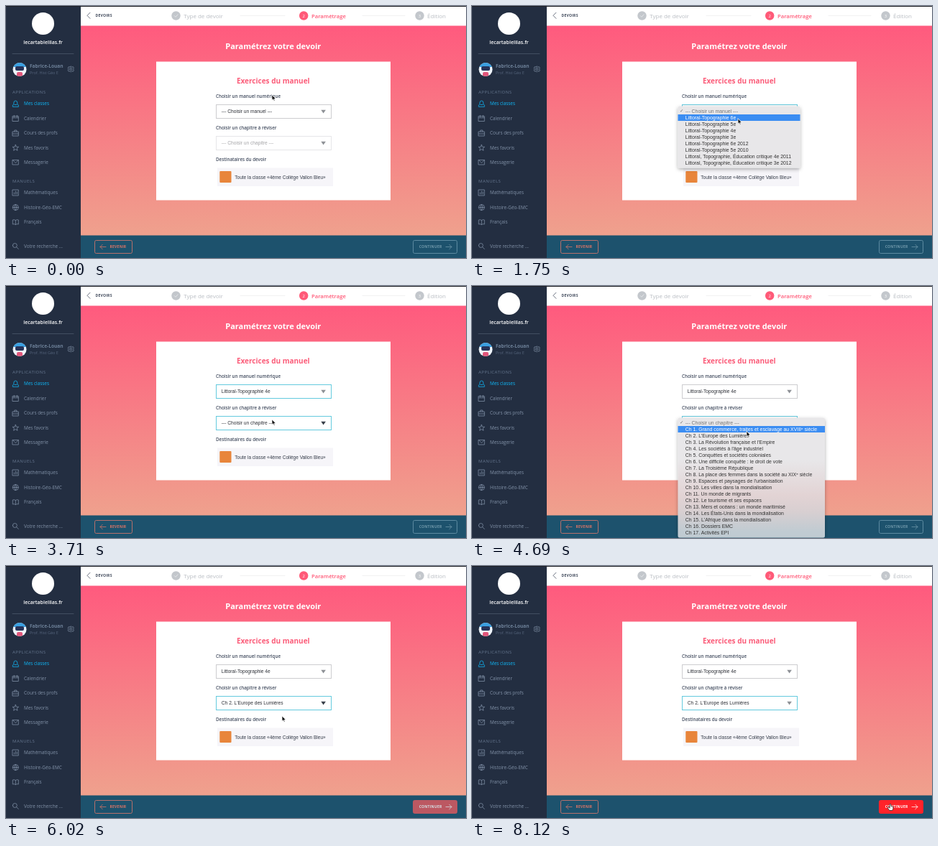
Write an HTML page that moves like this. It is 640x351 px and loops after 8.19 s.

```html
<!DOCTYPE html>
<html lang="fr">
<head>
<meta charset="utf-8">
<title>Paramétrez votre devoir</title>
<style>
  html, body { margin: 0; width: 100%; height: 100%; overflow: hidden; background: #232e41; }
  svg { display: block; width: 640px; height: 351px; font-family: "Open Sans", sans-serif; }
  .arial { font-family: "Liberation Sans", Arial, sans-serif; }
  .icon { fill: none; stroke-width: .75; stroke-linecap: round; stroke-linejoin: round; }
</style>
</head>
<body>
<svg id="stage" viewBox="0 0 640 351">
  <defs>
    <linearGradient id="sky" x2="0" y2="1">
      <stop stop-color="#ff5a7e"/><stop offset="1" stop-color="#efa18d"/>
    </linearGradient>
    <linearGradient id="glass" x2="0" y2="1">
      <stop offset=".35" stop-color="#e8e7e9"/><stop offset=".65" stop-color="#e2d3d4"/>
      <stop offset=".78" stop-color="#d8cfd1"/><stop offset=".95" stop-color="#c0cbd2"/>
    </linearGradient>
    <filter id="shadow" x="-10%" y="-10%" width="120%" height="125%">
      <feDropShadow dx="0" dy="2" stdDeviation="2.5" flood-opacity=".32"/>
    </filter>
    <clipPath id="face"><circle cx="19" cy="88.5" r="9.5"/></clipPath>
  </defs>
</svg>
<script>
const LOOP = 8190, CYAN = [100, 202, 222], GREY = [205, 205, 208];
const OPEN_BOOK = 1260, PICK_BOOK = 2450, OPEN_CHAPTER = 4130, PICK_CHAPTER = 5880, HOVER_NEXT = 7250;
const stage = document.getElementById('stage');

function add(tag, attrs, parent = stage) {
  const node = document.createElementNS('http://www.w3.org/2000/svg', tag);
  for (const name in attrs) node.setAttribute(name, attrs[name]);
  return parent.appendChild(node);
}
const set = (node, name, value) => node.setAttribute(name, value);
const rect = (x, y, width, height, fill, more = {}, parent) =>
  add('rect', { x, y, width, height, fill, ...more }, parent);
const path = (d, stroke, more = {}, parent) => add('path', { d, stroke, class: 'icon', ...more }, parent);
function text(content, x, y, size, fill, more = {}, parent) {
  const node = add('text', { x, y, 'font-size': size, fill, ...more }, parent);
  node.textContent = content;
  return node;
}
const arial = { class: 'arial' };
const bold = { 'font-weight': 700 };
const semi = { 'font-weight': 600 };
const middle = { 'text-anchor': 'middle' };

// Page background
rect(104, 27, 536, 293, 'url(#sky)');
rect(104, 0, 536, 27.5, '#fff');
rect(104, 319.5, 536, 31.5, '#1d526d');
rect(209, 77.5, 326, 193, '#fff');

// Sidebar
rect(0, 0, 104, 351, '#232e41');
rect(0, 0, 640, 1, '#1b1e24');
add('circle', { cx: 51.5, cy: 24.5, r: 15.5, fill: '#fff' });
text('lecartablelilas.fr', 51.5, 52.8, 7, '#fff', { ...semi, ...middle });
path('M9 66.5H94', '#4c586c');
const avatar = add('g', { 'clip-path': 'url(#face)' });
rect(9, 78, 20, 21, '#eef4fa', {}, avatar);
rect(9, 78, 20, 7, '#3a9fe0', {}, avatar);
rect(13, 84, 12, 6, '#27345a', { rx: 2 }, avatar);
rect(15, 92, 8, 7, '#e2577b', { rx: 2 }, avatar);
text('Fabrice-Louan', 33, 86, 6.6, '#6d8098', bold);
text('Prof. Hist Géo E', 33, 95, 5.5, '#56657d');
path('M90.3 84l1.3 1.1 1.8-.4.9 1.6-.7 1.6.7 1.6-.9 1.6-1.8-.4-1.3 1.1-1.3-1.1-1.8.4-.9-1.6.7-1.6-.7-1.6.9-1.6 1.8.4zM88.8 87.9a1.5 1.5 0 103 0 1.5 1.5 0 10-3 0', '#8090a6');

const caps = { 'letter-spacing': .5 };
text('APPLICATIONS', 9, 122.2, 6, '#66778f', caps);
text('MANUELS', 9, 246.2, 6, '#66778f', caps);

const book = 'M0-2.5Q-2-4-4-3V3Q-2 2 0 3.5Q2 2 4 3V-3Q2-4 0-2.5V3.5';
const links = [
  ['Mes classes', 136, 'M-4 4V2L-2.5 1V-1A2.5 3 0 012.5-1V1L4 2V4ZM-1.5 1.5H1.5'],
  ['Calendrier', 156.5, 'M-4-3H4V4H-4ZM-4-.8H4M-2-4.2V-2M2-4.2V-2'],
  ['Cours des profs', 177, 'M-4-2H4V4H-4ZM-1.5-2V-4H1.5V-2M-4 1H4'],
  ['Mes favoris', 197.5, 'M0-4.2L1.2-1.3 4.3-1.2 1.9.8 2.7 3.8 0 2.1-2.7 3.8-1.9.8-4.3-1.2-1.2-1.3Z'],
  ['Messagerie', 217.5, 'M-4-3H4V3.5H-4ZM-4-3L0 1 4-3'],
  ['Mathématiques', 260, 'M-4-4H4V4H-4ZM-2 2V0M0 2V-2M2 2V-1'],
  ['Histoire-Géo-EMC', 280.5, 'M-4 0A4 4 0 104 0 4 4 0 10-4 0H4M0-4Q-3 0 0 4M0-4Q3 0 0 4'],
  ['Français', 301, book],
  ['Votre recherche ...', 334.5, 'M-4-1A3 3 0 102-1 3 3 0 10-4-1M1.3 1.2L4 4']
];
links.forEach(([label, y, icon], i) => {
  const color = i ? '#8292a8' : '#0fb8f8';
  path(icon, color, { transform: `translate(13.3 ${y})` });
  text(label, 25, y + 2.3, 6.4, color);
});

// Stepper
path('M117 9.2L113 13.3L117 17.4', '#3c4658', { 'stroke-width': 1 });
text('DEVOIRS', 124.5, 15.2, 5, '#3c4658', { ...bold, 'letter-spacing': .25 });
path('M326 13.5H388M496 13.5H555', '#ececee');
[[236.5, '#c3c7cc'], [414.2, '#ff5a78'], [575.5, '#c3c7cc']].forEach(([cx, fill], i) => {
  add('circle', { cx, cy: 13.5, r: 6.2, fill });
  if (i) text(i + 1, cx, 15.6, 6, '#fff', middle);
});
path('M234.3 13.6L236 15.3L239 11.9', '#eceef0');
text('Type de devoir', 247.2, 16.5, 8, '#b9bdc3');
text('Paramétrage', 425, 16.5, 7.7, '#ff5a78', semi);
text('Édition', 586, 16.5, 8, '#b9bdc3');

// Form
text('Paramétrez votre devoir', 371.8, 59.8, 11, '#fff', { ...bold, ...middle });
text('Exercices du manuel', 371.8, 107.6, 10, '#fb5c79', { ...bold, ...middle });
text('Choisir un manuel numérique', 292, 127.6, 6.25, '#414b5e', semi);
text('Choisir un chapitre à réviser', 292, 171.6, 6.25, '#414b5e', semi);
text('Destinataires du devoir', 292, 215.6, 6.25, '#414b5e', semi);
rect(294, 225.5, 161, 25.5, '#f6f5f9');
rect(297.3, 230, 16.2, 16, '#e8853b', { rx: 1 });
text('Toute la classe «4ème Collège Vallon Bleu»', 318.3, 240.6, 6.5, '#333a47', arial);

function makeSelect(y) {
  return {
    box: rect(292.5, y - 9.5, 160, 19, '#fff', { 'stroke-width': 1 }),
    label: text('', 299.8, y + 2.4, 6.65, '#333', arial),
    arrow: add('path', { d: `M438.3 ${y - 2.3}h6.6l-3.3 4.8z` })
  };
}
const bookSelect = makeSelect(147), chapterSelect = makeSelect(191);

// Bottom bar
const buttonText = { ...bold, 'letter-spacing': .25 };
rect(123.5, 326.5, 52, 18, 'none', { rx: 2, stroke: '#b5706b', 'stroke-width': 1 });
path('M139 335.5H131M134.2 332.3L131 335.5L134.2 338.7', '#dc7566');
text('REVENIR', 144.5, 337.4, 5, '#dc7566', buttonText);
const nextBox = rect(566.5, 326.5, 61, 18, 'none', { rx: 2, 'stroke-width': 1 });
const nextLabel = text('CONTINUER', 574.7, 337.4, 5, '#fff', buttonText);
const nextArrow = path('M612 335.5H620M616.8 332.3L620 335.5L616.8 338.7', '#fff');

// Drop-down menus
function makeMenu(firstY, width, fill, items) {
  const group = add('g', arial);
  rect(286.5, firstY - 6.5, width, items.length * 9 + 5, fill, { rx: 2.5, filter: 'url(#shadow)' }, group);
  const bar = rect(286.5, 0, width, 9, '#3b8df2', {}, group);
  const tick = text('✓', 289, firstY + 2.4, 6.5, '#777', {}, group);
  const rows = items.map((item, i) => text(item, 296.8, firstY + i * 9 + 2.6, 6.9, '#333', {}, group));
  return (cursorY, opacity) => {
    set(group, 'opacity', opacity);
    const active = Math.max(0, Math.min(items.length - 1, Math.round((cursorY - firstY) / 9)));
    set(bar, 'y', firstY + active * 9 - 4);
    rows.forEach((row, i) => set(row, 'fill', i === active ? '#fff' : i ? '#333' : '#777'));
    set(tick, 'fill', active ? '#777' : '#fff');
  };
}
const bookNames = ['--- Choisir un manuel ---',
  ...['6e', '5e', '4e', '3e', '6e 2012', '5e 2010'].map(level => 'Littoral-Topographie ' + level),
  ...['4e 2011', '3e 2012'].map(level => 'Littoral, Topographie, Éducation critique ' + level)];
const chapterNames = ['--- Choisir un chapitre ---', ...[
  'Grand commerce, traites et esclavage au XVIIIᵉ siècle', "L'Europe des Lumières",
  "La Révolution française et l'Empire", "Les sociétés à l'âge industriel",
  'Conquêtes et sociétés coloniales', 'Une difficile conquête : le droit de vote',
  'La Troisième République', 'La place des femmes dans la société au XIXᵉ siècle',
  "Espaces et paysages de l'urbanisation", 'Les villes dans la mondialisation',
  'Un monde de migrants', 'Le tourisme et ses espaces', 'Mers et océans : un monde maritimisé',
  'Les États-Unis dans la mondialisation', "L'Afrique dans la mondialisation",
  'Dossiers EMC', 'Activités EPI'].map((name, i) => `Ch ${i + 1}. ${name}`)];
const drawBookMenu = makeMenu(146, 170, '#e8e7e9', bookNames);
const drawChapterMenu = makeMenu(190, 204.5, 'url(#glass)', chapterNames);

// Pointers
const pointer = path('M0 0V7.2L1.7 5.7L2.9 8.3L4.1 7.8L3 5.3H5.2Z', '#fff',
  { style: 'fill:#111', 'stroke-width': .5 });
const hand = path('M-.9-3.6Q0-4.6.8-3.6V-1Q3.7-1 4 .5Q4.2 3 2.8 5H-1.2Q-2.5 3-3.8 1.2Q-3.2 0-1.7 1L-.9 1.5Z', '#222',
  { style: 'fill:#fff', 'stroke-width': .7 });

const cursorKeys = [
  [70, 370, 124], [420, 370, 143], [1470, 370, 143], [1720, 370, 157], [1820, 370, 157],
  [2240, 370, 172], [2700, 370, 172], [3500, 370, 186], [4200, 370, 186], [4640, 382, 202.5],
  [5000, 382, 202.5], [5400, 384, 209], [6100, 384, 209], [6580, 447, 235], [7420, 582, 335.5]
];
const ramp = (t, start, length = 150) => Math.max(0, Math.min(1, (t - start) / length));
const between = (t, start, end) => ramp(t, start) * (1 - ramp(t, end));
const mix = (a, b, k) => `rgb(${a.map((v, i) => Math.round(v + (b[i] - v) * k))})`;

function cursorAt(t) {
  const i = cursorKeys.findIndex(key => key[0] > t);
  if (i < 1) return cursorKeys[i ? cursorKeys.length - 1 : 0].slice(1);
  const [t0, x0, y0] = cursorKeys[i - 1], [t1, x1, y1] = cursorKeys[i];
  const u = (t - t0) / (t1 - t0), k = u * u * (3 - 2 * u);
  return [x0 + (x1 - x0) * k, y0 + (y1 - y0) * k];
}

function drawSelect(select, label, border, arrow, enabled) {
  const idle = GREY.map(v => v + (1 - enabled) * 25);
  select.label.textContent = label;
  set(select.label, 'fill', mix([165, 165, 168], [45, 48, 55], enabled));
  set(select.box, 'stroke', mix(idle, CYAN, border));
  set(select.arrow, 'fill', mix([142, 145, 150], [55, 62, 72], arrow));
}
const menuOpacity = (t, open, close) => t < open ? 0 : 1 - ramp(t, close, 140);

function draw(t) {
  const [x, y] = cursorAt(t);
  drawSelect(bookSelect, bookNames[t < PICK_BOOK ? 0 : 3],
    between(t, 250, OPEN_CHAPTER), between(t, 250, 2900), 1);
  drawSelect(chapterSelect, chapterNames[t < PICK_CHAPTER ? 0 : 2],
    ramp(t, 3300), between(t, 3300, 6150), ramp(t, PICK_BOOK));
  drawBookMenu(y, menuOpacity(t, OPEN_BOOK, PICK_BOOK));
  drawChapterMenu(y, menuOpacity(t, OPEN_CHAPTER, PICK_CHAPTER));

  const ready = ramp(t, PICK_CHAPTER, 200), hot = ramp(t, HOVER_NEXT, 250);
  const fill = ready ? mix([29, 82, 109], [255, 91 - 56 * hot, 94 - 52 * hot], ready) : 'none';
  const ink = mix([113, 153, 171], [255, 255, 255], ready);
  set(nextBox, 'fill', fill);
  set(nextBox, 'stroke', ready ? fill : '#5d8ba1');
  set(nextLabel, 'fill', ink);
  set(nextArrow, 'stroke', ink);

  const overButton = t >= HOVER_NEXT;
  set(pointer, 'transform', `translate(${x} ${y})`);
  set(hand, 'transform', `translate(${x} ${y})`);
  set(pointer, 'visibility', overButton ? 'hidden' : 'visible');
  set(hand, 'visibility', overButton ? 'visible' : 'hidden');
}

const start = performance.now();
function tick() {
  draw((performance.now() - start) % LOOP);
  requestAnimationFrame(tick);
}
tick();
</script>
</body>
</html>
```
